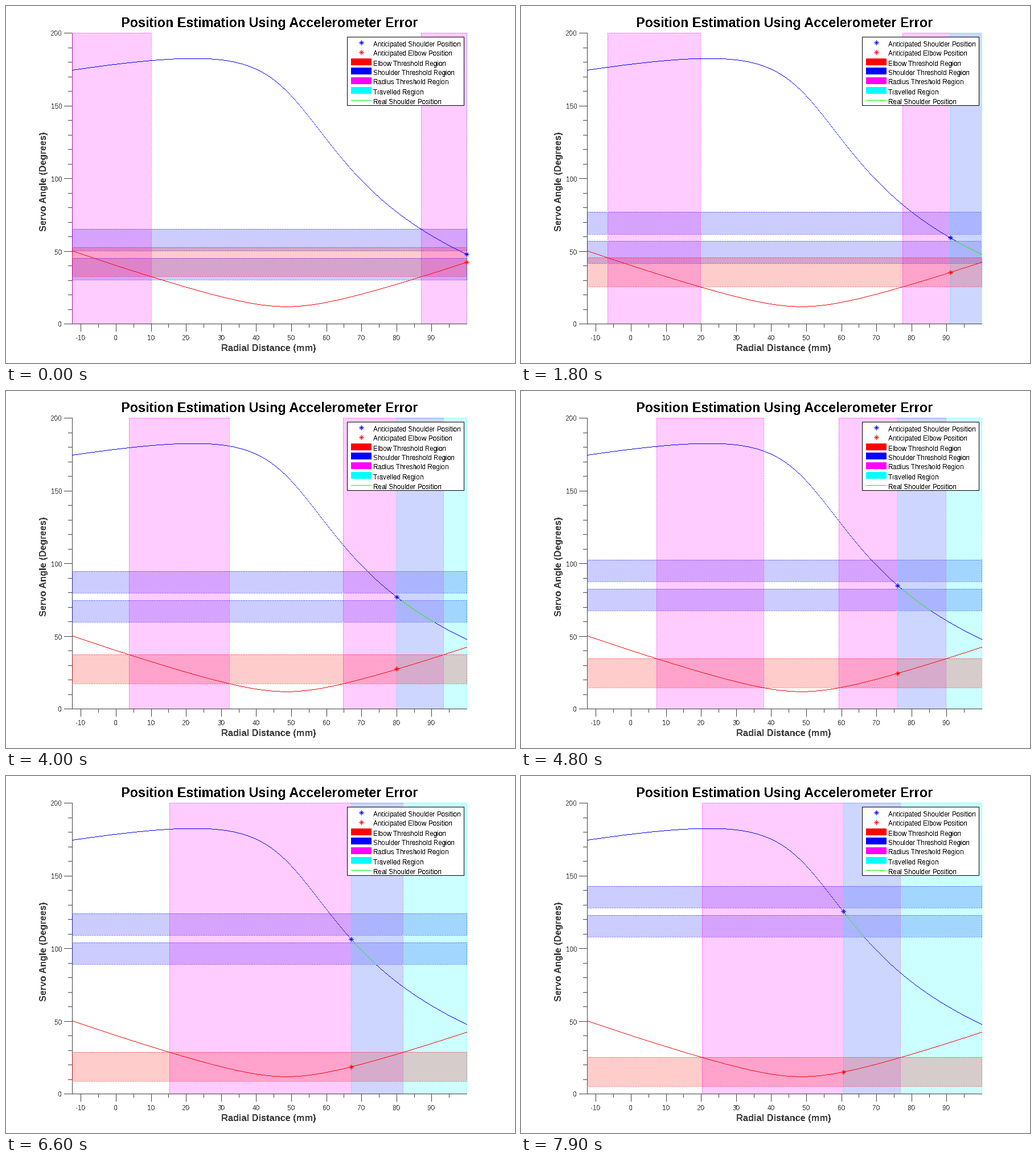
A matplotlib script for the animation above (8 s loop, 894x626 px).

```python
import numpy as np
import matplotlib.pyplot as plt
from matplotlib.animation import FuncAnimation
from matplotlib.patches import Polygon, Rectangle

W, H, DPI = 894, 626, 100
PX = 72 / DPI                      # one pixel in points
FRAMES, STEP_MS = 80, 100
R_MIN, R_MAX = -12.5, 100
LEFT, RIGHT, TOP, BOTTOM = 116.5, 809.5, 47.5, 557.5
GREY = "#404040"

# Two-link arm: upper arm, forearm, base offset (mm) and base angle (deg)
UPPER, FORE = 65.5, 83.95
BASE_R, BASE_H, BASE_ANGLE = 48.55, 24, -63.7

plt.rcParams.update({"font.family": "Liberation Sans",
                     "text.antialiased": False,
                     "path.simplify": False})


def elbow(r):
    reach2 = (r - BASE_R) ** 2 + BASE_H ** 2
    return np.degrees(np.arccos((UPPER**2 + FORE**2 - reach2) / (2 * UPPER * FORE)))


def shoulder(r):
    d = r - BASE_R
    reach = np.hypot(d, BASE_H)
    inner = np.arccos((UPPER**2 - FORE**2 + reach**2) / (2 * UPPER * reach))
    return np.degrees(np.arctan2(BASE_H, d) + inner) + BASE_ANGLE


def half_span(angle):
    """Distance from the base axis at which the elbow has this angle."""
    reach2 = UPPER**2 + FORE**2 - 2 * UPPER * FORE * np.cos(np.radians(angle))
    return np.sqrt(max(reach2 - BASE_H**2, 0))


def centre(v):
    """Middle of the pixel that holds v."""
    return np.floor(v + 1e-6) + 0.5


def sx(r):
    return centre(LEFT + (r - R_MIN) * (RIGHT - LEFT) / (R_MAX - R_MIN))


def sy(angle):
    return centre(BOTTOM - (BOTTOM - TOP) * angle / 200)


fig = plt.figure(figsize=(W / DPI, H / DPI), dpi=DPI, facecolor="white")
ax = fig.add_axes([0, 0, 1, 1])
ax.set(xlim=(0, W), ylim=(H, 0))
ax.axis("off")


def line(xs, ys, color, z, cap="projecting", **kw):
    return ax.plot(xs, ys, color=color, zorder=z, lw=PX, snap=False,
                   clip_on=False, solid_capstyle=cap, **kw)[0]


def box(x, y, w, h, z, **kw):
    ax.add_patch(Rectangle((x, y), w, h, lw=PX, snap=False, zorder=z, **kw))


def label(x, y, text, size, color="black", **kw):
    ax.text(x, y, text, fontsize=size * PX, color=color, zorder=20,
            va="baseline", rotation_mode="anchor", **kw)


def pixel_run(xs, ys):
    """One pixel per column, as separate unit-long strokes."""
    gap = np.full(len(xs), np.nan)
    return (np.column_stack([xs - 0.5, xs + 0.5, gap]).ravel(),
            np.column_stack([ys, ys, gap]).ravel())


def star_shape(x, y):
    a, b, gap = 4, 2.5, np.nan
    return (x + np.array([-a, a, gap, 0, 0, gap, -b, b, gap, -b, b]),
            y + np.array([0, 0, gap, -a, a, gap, -b, b, gap, b, -b]))


class Region:
    """Translucent box with a dotted outline."""

    def __init__(self, color, z):
        self.fill = Polygon(np.zeros((4, 2)), fc=color, ec="none", lw=0,
                            alpha=0.2, zorder=z, snap=False)
        ax.add_patch(self.fill)
        self.edge = line([], [], color, z + 0.1,
                         ls=(0.5, (1, 2)), dash_capstyle="butt")

    def set(self, r0, r1, a0=0, a1=200):
        x0, x1 = sx(np.clip([r0, r1], R_MIN, R_MAX))
        y0, y1 = sy(a0), sy(a1)
        xs, ys = [x0, x1, x1, x0], [y1, y1, y0, y0]
        self.fill.set_xy(np.column_stack([xs, ys]) - 0.5)
        self.edge.set_data(xs + xs[:1], ys + ys[:1])

    def show(self, on):
        self.fill.set_visible(on)
        self.edge.set_visible(on)


def draw_axes():
    line([LEFT, LEFT], [TOP, BOTTOM], GREY, 1)
    line([LEFT, RIGHT], [BOTTOM, BOTTOM], GREY, 9)
    for r in range(-10, 100, 5):
        major = r % 10 == 0
        line([sx(r)] * 2, [BOTTOM, BOTTOM + (13 if major else 6)], GREY, 1)
        if major:
            label(sx(r) - 0.5, 586.5, str(r), 11.7, GREY, ha="center")
    for a in range(0, 201, 10):
        major = a % 50 == 0
        line([LEFT - (14 if major else 7), LEFT], [sy(a)] * 2, GREY, 1)
        if major:
            label(98.5, sy(a) + 5, str(a), 11.7, GREY, ha="right")
    label(463, 36.7, "Position Estimation Using Accelerometer Error", 23.4,
          ha="center", weight="bold")
    label(461.5, 605.5, "Radial Distance (mm)", 16.4, GREY,
          ha="center", weight="bold")
    label(71, 308, "Servo Angle (Degrees)", 16.4, GREY,
          ha="center", weight="bold", rotation=90)


def draw_legend():
    box(599.5, 54.5, 205, 120, 15, fc="white", ec="black")
    rows = [("Anticipated Shoulder Position", "blue", "star"),
            ("Anticipated Elbow Position", "red", "star"),
            ("Elbow Threshold Region", "red", "box"),
            ("Shoulder Threshold Region", "blue", "box"),
            ("Radius Threshold Region", "magenta", "box"),
            ("Travelled Region", "cyan", "box"),
            ("Real Shoulder Position", "lime", "line")]
    for i, (text, color, kind) in enumerate(rows):
        y = centre(64.5 + 16.75 * i)
        label(645, y + 6, text, 11.7)
        if kind == "star":
            line(*star_shape(624.5, y), color, 17)
        elif kind == "box":
            box(606.5, y - 6, 35, 11, 17, fc=color, ec=color)
        else:
            line([606.5, 641.5], [y, y], color, 17)


draw_axes()
draw_legend()

columns = np.arange(LEFT, RIGHT + 1)
radii = R_MIN + (columns - LEFT) * (R_MAX - R_MIN) / (RIGHT - LEFT)
angles = shoulder(radii)
line(*pixel_run(columns, sy(angles)), "blue", 10, cap="butt")
line(*pixel_run(columns, sy(elbow(radii))), "red", 10, cap="butt")
real = line([], [], "lime", 11, cap="butt")
shoulder_star = line([], [], "blue", 12)
elbow_star = line([], [], "red", 12)

upper_band, lower_band = Region("blue", 2), Region("blue", 3)
left_zone, right_zone = Region("magenta", 4), Region("magenta", 5)
travelled = Region("cyan", 6)
elbow_band = Region("red", 7)


def update(n):
    r = R_MAX - 0.5 * n
    s, e = shoulder(r), elbow(r)

    upper_band.set(R_MIN, R_MAX, s + 2.5, s + 17.5)
    lower_band.set(R_MIN, R_MAX, s - 17.5, s - 2.5)
    elbow_band.set(R_MIN, R_MAX, e - 10, e + 10)
    travelled.set(r, R_MAX)

    inner, outer = half_span(e - 10), half_span(e + 10)
    split = e - 10 > elbow(BASE_R)
    left_zone.set(BASE_R - outer, BASE_R - inner if split else BASE_R + outer)
    right_zone.set(BASE_R + inner, BASE_R + outer)
    right_zone.show(split)

    on = (angles >= s - 17.5) & (angles <= s - 2.5)
    real.set_data(*pixel_run(columns[on], sy(angles[on])))
    shoulder_star.set_data(*star_shape(sx(r), sy(s)))
    elbow_star.set_data(*star_shape(sx(r), sy(e)))
    return []


anim = FuncAnimation(fig, update, frames=FRAMES, interval=STEP_MS,
                     repeat=True, repeat_delay=0)
plt.show()
```
